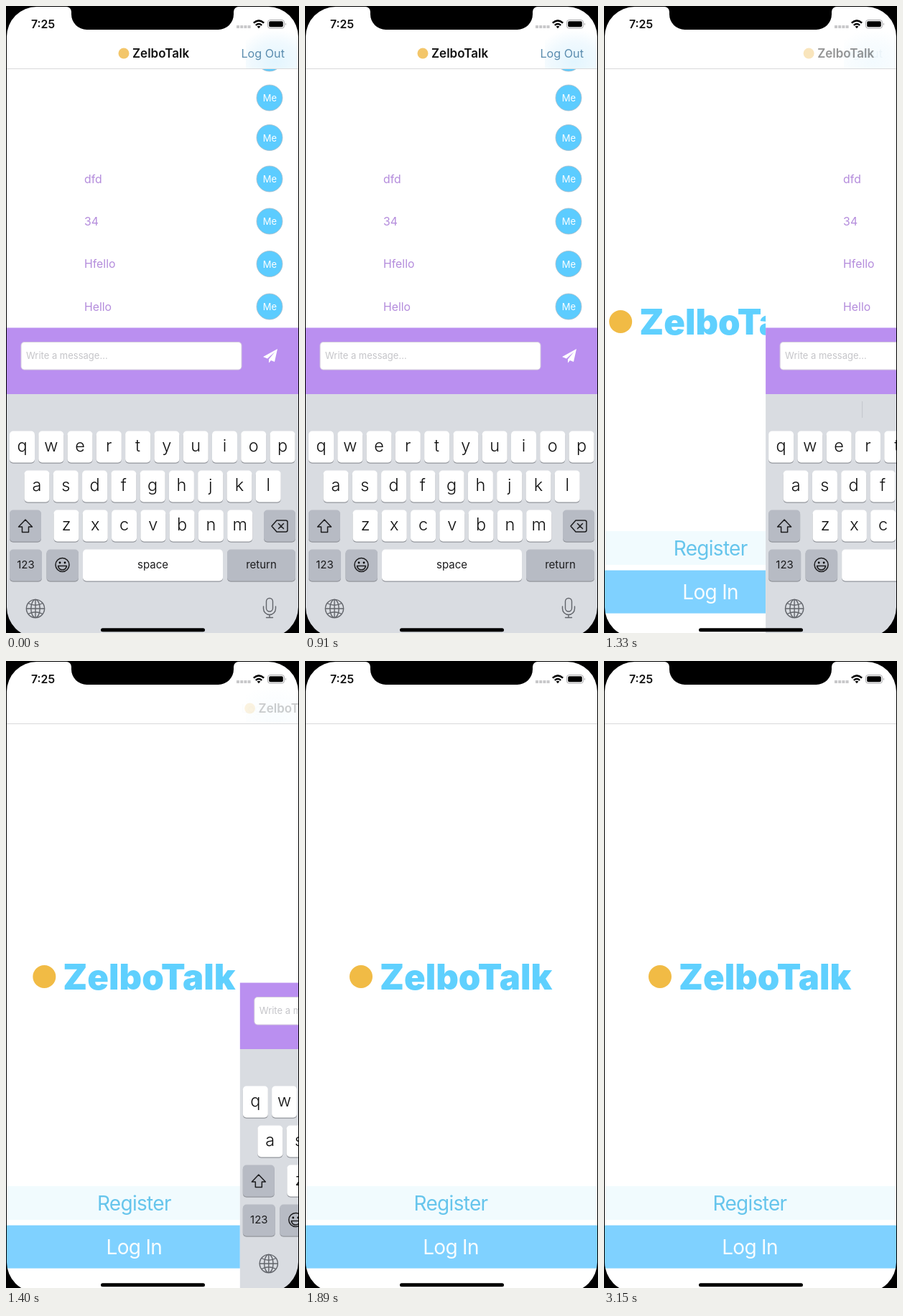
Animation of 408 by 874 pixels, one loop 3.43 s. Source, as an HTML page:

```html
<!DOCTYPE html>
<html lang="en">
<head>
<meta charset="utf-8">
<title>Chat log out</title>
<style>
  html, body { margin: 0; width: 100%; height: 100%; overflow: hidden; background: #000; }
  svg { display: block; width: 408px; height: 874px; font-family: Inter, Roboto, sans-serif; }
  .mid { text-anchor: middle; }
  .key { font-size: 23.5px; font-weight: 300; fill: #111; }
  .word { font-size: 15px; fill: #1c1c1e; }
  .icon { fill: none; stroke: #1c1c1e; stroke-width: 1.5; stroke-linejoin: round; stroke-linecap: round; }
  .tool { fill: none; stroke: #62656b; stroke-width: 1.4; stroke-linecap: round; }
  .msg { font-size: 15.8px; fill: #b48cdc; }
  .me { font-size: 13px; fill: #fff; }
  .action { font-size: 28px; font-weight: 430; letter-spacing: -.025em; }
</style>
</head>
<body>
<svg viewBox="0 0 408 874">
  <rect width="408" height="874" fill="#fff"/>

  <g id="login">
    <circle cx="78" cy="440" r="16" fill="#f1bb45"/>
    <text x="104" y="458" font-size="49" font-weight="900" fill="#5fd0fe">ZelboTalk</text>
    <rect y="732" width="408" height="47" fill="#f1fbfe"/>
    <text class="action mid" x="203" y="766" fill="#66c5ec">Register</text>
    <rect y="786.6" width="408" height="60" fill="#7fd1ff"/>
    <text class="action mid" x="203" y="827" fill="#f8fdff">Log In</text>
  </g>

  <g id="chat">
    <rect x="1" y="80" width="407" height="794" fill="#fff"/>
    <g id="list"></g>

    <rect x="1" y="448.5" width="407" height="92.5" fill="#ba8ff0"/>
    <rect x="21" y="468.5" width="307" height="38.5" rx="4.5" fill="#fff" stroke="#d3cbdc"/>
    <text x="28" y="492" font-size="13" fill="#c5c5c9">Write a message...</text>
    <rect id="caret" x="27.5" y="478" width="2" height="19" rx="1" fill="#4a74d8"/>
    <path d="M378 478 358 489 364 491.5 374.5 482 366 492.5 366 497.5 369 494 374 496Z" fill="#fff"/>

    <rect x="1" y="541" width="407" height="333" fill="#d9dce1"/>
    <path id="divider" d="M135.5 551V574" stroke="#c3c6cc"/>
    <g id="keys"></g>
    <path class="icon" d="M27 716 36.5 726H31.5V733.5H22.5V726H17.5Z"/>
    <path class="icon" d="M377 717H389.5Q392 717 392 719.5V730.5Q392 733 389.5 733H377L370 725ZM379.5 721.5 386.5 728.5M386.5 721.5 379.5 728.5"/>
    <circle class="icon" cx="78.5" cy="779" r="9.5"/>
    <circle cx="75" cy="776" r="1.4"/>
    <circle cx="82" cy="776" r="1.4"/>
    <path class="icon" d="M72.5 780.5H84.5Q83.5 786 78.5 786T72.5 780.5Z"/>
    <path class="tool" d="M28.5 840H53.5M41 827.5V852.5M31 832.5Q41 838 51 832.5M31 847.5Q41 842 51 847.5"/>
    <circle class="tool" cx="41" cy="840" r="12.6"/>
    <ellipse class="tool" cx="41" cy="840" rx="6.2" ry="12.6"/>
    <rect class="tool" x="362.5" y="825.5" width="9" height="18.5" rx="4.5"/>
    <path class="tool" d="M358.5 837V840A8.5 8.5 0 0 0 375.5 840V837M367 848.5V852.5M362.5 852.5H371.5"/>
  </g>

  <g id="bar">
    <rect width="408" height="87" fill="#fff"/>
    <rect id="tint" x="334" y="26" width="74" height="61" fill="url(#glow)"/>
    <rect y="87" width="408" height="1" fill="#d9d9db"/>
    <g id="title">
      <circle cx="164" cy="66" r="7.5" fill="#f3c66a"/>
      <text x="176" y="72" font-size="17" font-weight="600" fill="#111">ZelboTalk</text>
    </g>
    <text id="out" x="388" y="72" text-anchor="end" font-size="16.2" fill="#5a8cae">Log Out</text>
  </g>

  <g id="status">
    <text x="35" y="31" font-size="15.8" font-weight="600" fill="#111">7:25</text>
    <path d="M321 29H341" stroke="#c8c8ca" stroke-width="4" stroke-dasharray="4 1.2"/>
    <g fill="none" stroke="#000" stroke-width="2.5">
      <path d="M344.8 23.6Q352 17.2 359.2 23.6M347.8 26.9Q352 23.2 356.2 26.9"/>
      <path d="M352 31.2 349.6 28.6Q352 27 354.4 28.6Z" fill="#000" stroke="none"/>
    </g>
    <rect x="364.5" y="19.5" width="23" height="11.5" rx="3.3" fill="none" stroke="#a5a5a8"/>
    <rect x="366.2" y="21.2" width="19.6" height="8.1" rx="1.8"/>
    <path d="M389 23.3Q391 25.2 389 27.2Z" fill="#a5a5a8"/>
  </g>

  <path d="M84 0V1A7 7 0 0 1 91 8V11.5A21.5 21.5 0 0 0 112.5 33H295.5A21.5 21.5 0 0 0 317 11.5V8A7 7 0 0 1 324 1V0Z"/>
  <rect x="132" y="867.3" width="145" height="5" rx="2.5"/>
  <path fill-rule="evenodd" d="M0 0H408V874H0ZM43 1A42 42 0 0 0 1 43V838A42 42 0 0 0 43 880H365A42 42 0 0 0 407 838V43A42 42 0 0 0 365 1Z"/>

  <defs>
    <radialGradient id="glow" cx=".55" cy=".85" r=".75">
      <stop offset="0" stop-color="#e3f5fe"/>
      <stop offset=".6" stop-color="#f0f9fe"/>
      <stop offset="1" stop-color="#fff"/>
    </radialGradient>
  </defs>
</svg>

<script>
const LOOP = 3430, STEP = 70, WIDTH = 407;
const TAP = 1120, POP = 1260, SETTLED = 1750, DECAY = 87.5;
const el = id => document.getElementById(id);

function add(parent, tag, attrs, text) {
  const node = document.createElementNS(parent.namespaceURI, tag);
  for (const name in attrs) node.setAttribute(name, attrs[name]);
  if (text) node.textContent = text;
  parent.append(node);
}

function key(x, y, width, label, cls, dark) {
  const shape = { x, width, height: 44, rx: 5 };
  add(el('keys'), 'rect', { ...shape, y: y + 1.2, fill: '#94979d' });
  add(el('keys'), 'rect', { ...shape, y, fill: dark ? '#b7bbc4' : '#fff' });
  if (label) {
    const drop = cls === 'key' ? 28.5 : 26.5;
    add(el('keys'), 'text', { x: x + width / 2, y: y + drop, class: cls + ' mid' }, label);
  }
}

function keyRow(letters, left, y) {
  [...letters].forEach((c, i) => key(left + i * 40.28, y, 35, c, 'key'));
}

keyRow('qwertyuiop', 5, 592.5);
keyRow('asdfghjkl', 25.5, 647.5);
keyRow('zxcvbnm', 66.5, 702.5);
key(5, 702.5, 44, '', '', true);
key(359, 702.5, 44, '', '', true);
key(5, 757.5, 45, '123', 'word', true);
key(56.5, 757.5, 44.5, '', '', true);
key(107, 757.5, 195, 'space', 'word');
key(308, 757.5, 95, 'return', 'word', true);

const rows = [[73, ''], [128, ''], [183.5, ''], [241, 'dfd'], [300, '34'], [359.5, 'Hfello'], [419, 'Hello']];
for (const [y, text] of rows) {
  add(el('list'), 'circle', { cx: 367, cy: y, r: 18, fill: '#5cccff', stroke: '#a9bcc8', 'stroke-width': .8 });
  add(el('list'), 'text', { x: 367.5, y: y + 5, class: 'me mid' }, 'Me');
  if (text) add(el('list'), 'text', { x: 109, y: y + 5.5, class: 'msg' }, text);
}

const clamp = v => Math.max(0, Math.min(1, v));
const shift = (id, x) => el(id).setAttribute('transform', `translate(${x.toFixed(2)} 0)`);
const fade = (id, a) => el(id).setAttribute('opacity', a.toFixed(3));

function draw(t) {
  // share of the chat screen still to slide away
  const rest = t <= POP ? 1 : t >= SETTLED ? 0 : Math.exp((POP - t) / DECAY);
  shift('chat', WIDTH * (1 - rest));
  shift('login', -0.3 * WIDTH * rest);
  shift('title', 220 * (1 - rest));
  fade('title', rest);
  fade('tint', rest);
  fade('out', (t < TAP ? 1 : .35) * rest ** 2);
  fade('divider', t >= POP - STEP ? 1 : 0);
  fade('caret', clamp((t - 280) / 140) * clamp((910 - t) / 140));
}

// biased by half a screen refresh so steps fall on time
const start = performance.now() - 8;
function tick() {
  const t = (performance.now() - start) % LOOP;
  draw(Math.floor(t / STEP) * STEP);
  requestAnimationFrame(tick);
}
tick();
</script>
</body>
</html>
```
